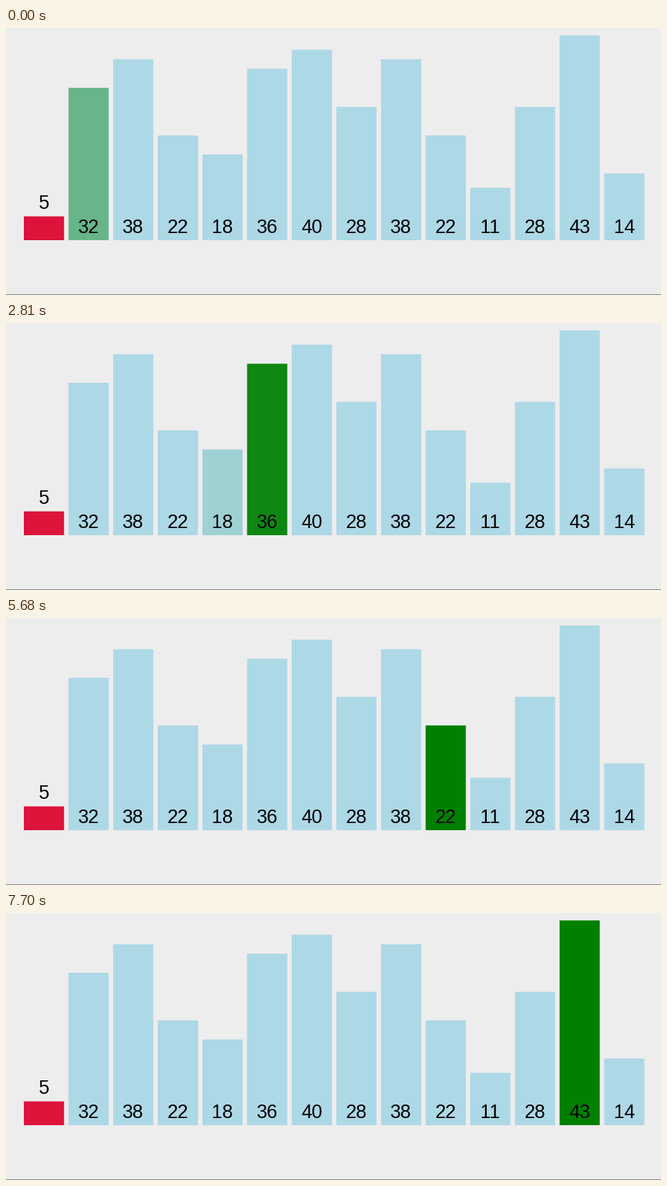
Animation, 917 px wide and 375 px high, one loop 8000 ms. Source, as a matplotlib script:

```python
import matplotlib.pyplot as plt
import numpy as np
from matplotlib.animation import FuncAnimation
from matplotlib.patches import Rectangle

WIDTH, HEIGHT, DPI = 917, 375, 100
LOOP_MS, STEP_MS = 8000, 20

VALUES = [5, 32, 38, 22, 18, 36, 40, 28, 38, 22, 11, 28, 43, 14]
BASE_Y, UNIT = 298, 6.688
LEFT, PITCH, BAR_W = 25, 62.5, 56.25

BACKGROUND = "#ededed"
KEY = "#dc143c"
IDLE = np.array([173, 216, 230]) / 255
ACTIVE = np.array([0, 128, 0]) / 255

# The highlight moves one bar per PERIOD_MS, fading over FADE_MS,
# and is shown in held steps of TICK_MS.
PERIOD_MS, FADE_MS, FADE_LEAD_MS = 690, 245, 106
TICK_MS, TICK_LEAD_MS = 136, 55

fig = plt.figure(figsize=(WIDTH / DPI, HEIGHT / DPI), dpi=DPI, facecolor=BACKGROUND)
ax = fig.add_axes([0, 0, 1, 1])
ax.set_xlim(0, WIDTH)
ax.set_ylim(HEIGHT, 0)
ax.axis("off")


def add_rect(x, y, w, h, color):
    return ax.add_patch(Rectangle((x, y), w, h, facecolor=color, linewidth=0, snap=False))


def add_bar(index, value):
    x, h = LEFT + index * PITCH, value * UNIT
    bar = add_rect(x, BASE_Y - h, BAR_W, h, IDLE)
    # A bar too short for its label carries it on top.
    baseline = 288 if h > 40 else 254
    ax.text(x + BAR_W / 2, baseline, str(value), ha="center", va="baseline",
            family="Liberation Sans", fontsize=26.7 * 72 / DPI, color="black")
    return bar


def smoothstep(u):
    u = min(max(u, 0), 1)
    return u * u * (3 - 2 * u)


def cursor_at(ms):
    """Bar position of the highlight, fractional while it crossfades."""
    held = (ms + TICK_LEAD_MS) // TICK_MS * TICK_MS
    index, elapsed = divmod(held + FADE_LEAD_MS, PERIOD_MS)
    return index + smoothstep(elapsed / FADE_MS)


bars = [add_bar(i, v) for i, v in enumerate(VALUES)]
bars[0].set_facecolor(KEY)
add_rect(0, HEIGHT - 1, WIDTH, 1, "#808080")


def update(frame):
    cursor = cursor_at((frame + 0.5) * STEP_MS)
    for i, bar in enumerate(bars[1:], start=1):
        level = max(0, 1 - abs(cursor - i))
        bar.set_facecolor(IDLE + (ACTIVE - IDLE) * level)
    return bars


anim = FuncAnimation(fig, update, frames=LOOP_MS // STEP_MS, interval=STEP_MS,
                     repeat=True, repeat_delay=0, blit=False)
plt.show()
```
